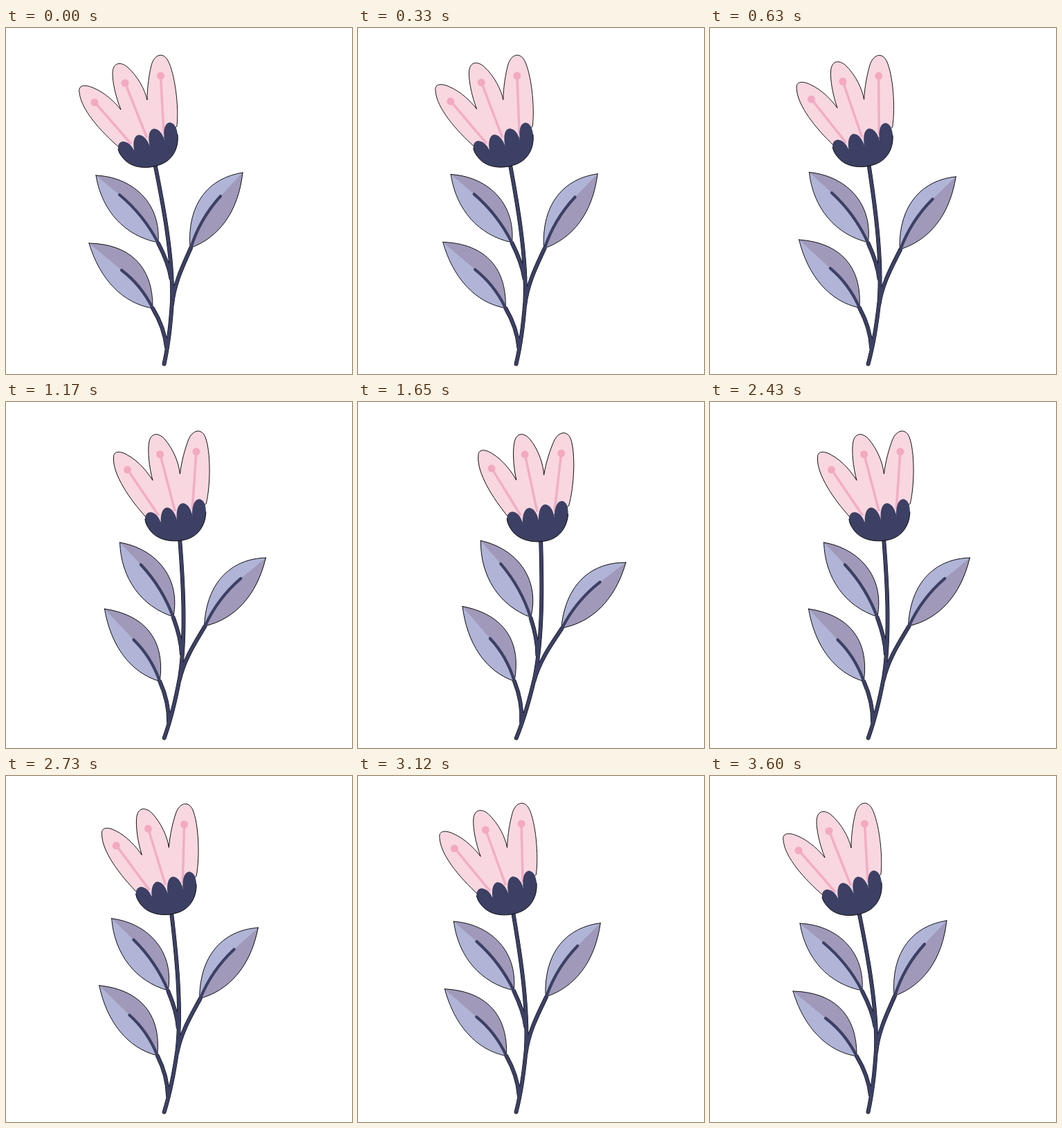
Animation, 500 px wide and 500 px high, one loop 3660 ms. Source, as an HTML page:

```html
<!DOCTYPE html>
<html lang="en">
<head>
<meta charset="utf-8">
<title>Swaying flower</title>
<style>
  html, body { margin: 0; width: 100%; height: 100%; overflow: hidden; background: #fff; }
  svg { display: block; width: 100%; height: 100%; }
  path { stroke-linecap: round; stroke-linejoin: round; }
  .edge { stroke: #000; stroke-width: .9; }
  .light { fill: #b0b4d7; }
  .shade { fill: #a099b9; }
  .line { fill: none; stroke: #3c4064; }
  .stamen { fill: none; stroke: #f3adc4; stroke-width: 3.5; }
  .dot { fill: #f3a9c1; }
</style>
</head>
<body>
<svg viewBox="0 0 500 500">
  <defs>
    <path id="stem" d="M215.5 198C225 245 242 330 240 395Q237 447 228.5 485.5M267 318C256 343 243 369 240 400
      M220 311Q235 340 238.5 362M212 405Q229 433 232 462"/>
    <path id="leaves" d="M342 209C295 216 261 252 266 318C308 303 336 265 342 209Z
      M130 213C180 215 224 250 220 310C172 301 138 264 130 213Z
      M120 311C176 312 213 342 212 405C168 398 135 362 120 311Z"/>
  </defs>
  <g id="flower">
    <use href="#stem" fill="none" stroke="#000" stroke-width="5.8"/>
    <use href="#stem" class="line" stroke-width="4.8"/>

    <use href="#leaves" class="light"/>
    <path class="shade" d="M342 209L310 243Q280 276 266 318C308 303 336 265 342 209Z
      M130 213C180 215 224 250 220 310Q199 270 164 241Z
      M120 311C176 312 213 342 212 405Q195 371 167 350Z"/>
    <use href="#leaves" class="edge" fill="none"/>
    <path class="line" stroke-width="4.2" d="M310 243Q280 276 267 318M164 241Q199 270 220 311M167 350Q195 371 212 405"/>

    <path class="edge" fill="#f8d7e0" d="M164 173C136 149 108 117 106 93C104 83 113 81 125 86C143 93 158 108 166 118
      C158 98 154 78 154 66C154 50 165 48 175 56C191 70 201 90 204 104
      C204 85 207 66 210 54C214 38 227 34 234 47C244 66 250 112 247 142L205 180Z"/>
    <path class="stamen" d="M128 107L180 166.5M172 79L203 157M223.5 69L228 152"/>
    <g class="dot">
      <circle cx="128" cy="107.5" r="5.5"/>
      <circle cx="172" cy="79.5" r="5.5"/>
      <circle cx="223.5" cy="69" r="5.5"/>
    </g>
    <path fill="#3c4064" d="M162 175C161 167 166 163.5 170 164C178 165 183 172 186 179C183 169 184 156 191.5 154.5
      C199 154 205 163 208 171C205 159 206 147 213.5 145.5C221 145 227 154 229.5 163C227 151 228 138 236.5 136.5
      C243 137 247 144 248 154C250 172 242 190 224 197C204 205 183 202 172 191C166 185 163 180 162 175Z"/>
    <path class="edge" fill="none" d="M248 154C250 172 242 190 224 197C204 205 183 202 172 191C166 185 163 180 162 175"/>
  </g>
</svg>
<script>
  const LOOP = 3660, SWING = 1800, STEP = 30, MAX_ANGLE = 9.85;
  const flower = document.getElementById('flower');
  const ease = u => u * u * (3 - 2 * u);

  function draw() {
    const t = Math.floor(performance.now() % LOOP / STEP) * STEP;
    const u = Math.max(0, 1 - Math.abs(t / SWING - 1));
    flower.setAttribute('transform', `rotate(${MAX_ANGLE * ease(u)} 228 487)`);
    requestAnimationFrame(draw);
  }
  draw();
</script>
</body>
</html>
```
